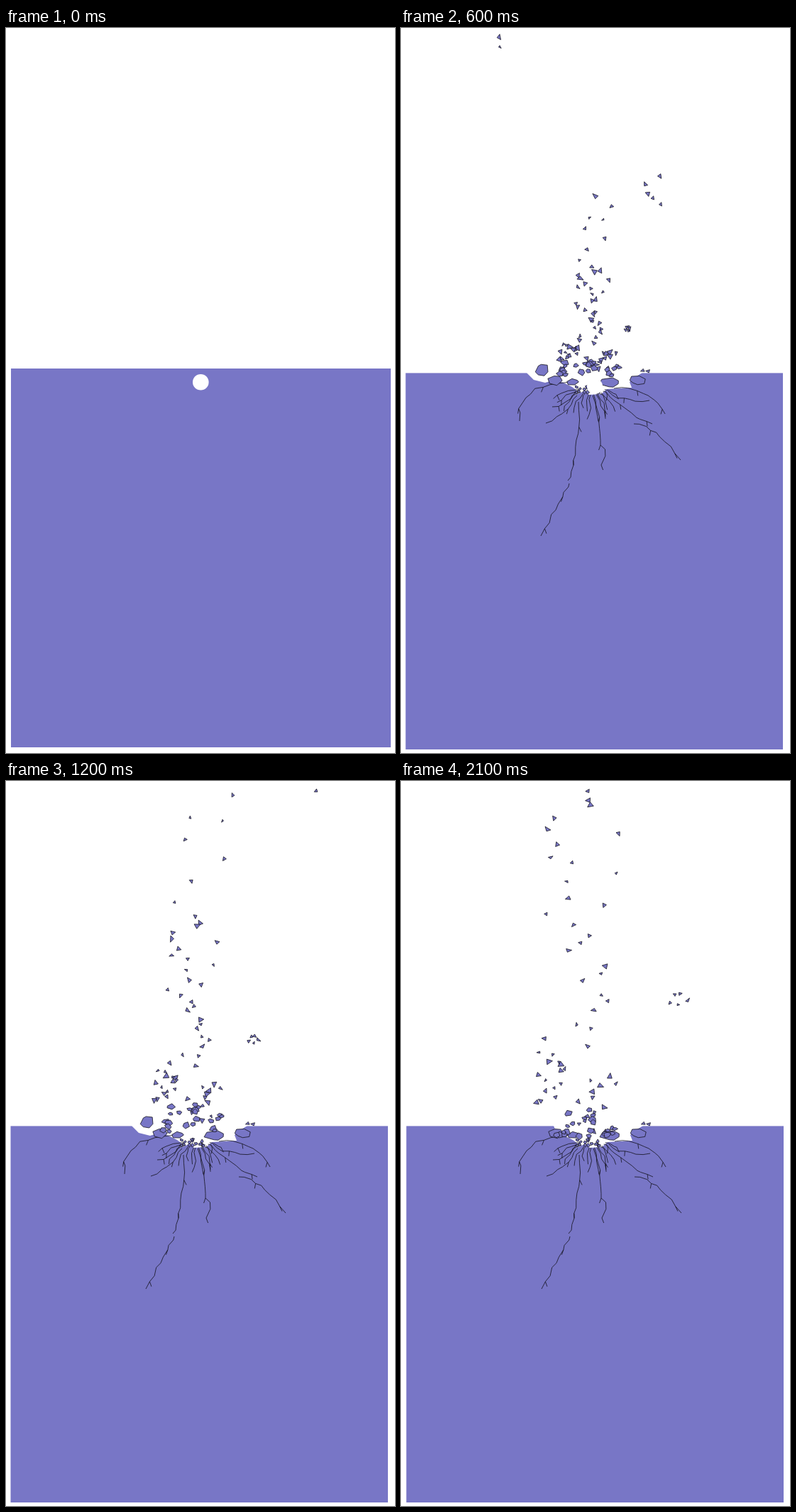
These frames come from a looping animation (548x1022 px, 2.2 s). An HTML page with a canvas:

```html
<!DOCTYPE html>
<html lang="en">
<head>
<meta charset="utf-8">
<title>Impact</title>
<style>
html, body { margin: 0; width: 100%; height: 100%; overflow: hidden; background: #fff; }
canvas { display: block; }
</style>
</head>
<body>
<canvas id="stage" width="548" height="1022"></canvas>
<script>
const ctx = document.getElementById('stage').getContext('2d');
const FILL = '#7876c6', INK = '#15131f', GRAVITY = 0.45, GROUND = 486.4;

// Launch ranges; speeds are pixels per step of 100 ms.
const bursts = [
  { name: 'sparks left', n: 3, x: [268, 274], vx: [-27, -17], vy: [-86, -80], r: 3 },
  { name: 'sparks right', n: 3, x: [270, 276], vx: [25, 33], vy: [-90, -84], r: 3 },
  { name: 'right shot', n: 5, x: [274, 296], vx: [11.4, 12], vy: [-50.5, -42], r: 3 },
  { name: 'column', n: 8, x: [262, 274], vx: [-3, 4], vy: [-46, -30], r: 3.2 },
  { name: 'plume', n: 29, x: [250, 292], vx: [-3.6, 1.6], vy: [-29, -9.5], r: 3.4 },
  { name: 'right cluster', n: 5, x: [288, 292], vx: [4.2, 5.6], vy: [-14.6, -13.5], r: 2.8 },
  { name: 'left debris', n: 14, x: [234, 262], vx: [-2.6, -1], vy: [-10.5, -6.6], r: 3.5 },
  { name: 'low debris', n: 14, x: [264, 310], vx: [-1.8, 0.6], vy: [-9, -4.5], r: 3.5 },
  { name: 'chunks', n: 22, x: [222, 312], vx: [-0.5, 0.4], vy: [-6.4, -3], r: 4.6, sides: 5 }
];

// Start, bend and end of the long cracks
const cracks = [
  [250, 527, 253, 600, 235, 638], [237, 642, 224, 670, 197, 716],
  [270, 518, 284, 560, 281, 588], [281, 588, 293, 596, 282, 616],
  [288, 512, 318, 546, 354, 558], [292, 512, 315, 530, 350, 525],
  [300, 508, 352, 505, 372, 544], [328, 558, 364, 566, 394, 609],
  [240, 499, 160, 502, 167, 554], [246, 512, 232, 534, 213, 534],
  [248, 518, 236, 545, 204, 557]
];

const rnd = n => { const v = Math.sin(n * 127.1 + 3.7) * 43758.5453; return v - Math.floor(v); };
const mix = (a, b, k) => a + (b - a) * k;

function disc(x, y, r) {
  ctx.fillStyle = '#fff';
  ctx.beginPath();
  ctx.arc(x, y, r, 0, Math.PI * 2);
  ctx.fill();
}

function chip(x, y, r, sides, seed, turn, flat = 1) {
  ctx.beginPath();
  for (let i = 0; i < sides; i++) {
    const angle = turn + (i + 0.5 * rnd(seed + i * 9)) * Math.PI * 2 / sides;
    const d = r * (0.75 + 0.5 * rnd(seed + i * 5 + 2));
    ctx.lineTo(x + d * Math.cos(angle), y + d * Math.sin(angle) * flat);
  }
  ctx.closePath();
  ctx.fillStyle = FILL;
  ctx.fill();
  ctx.stroke();
}

function crack([x0, y0, xb, yb, x1, y1], seed) {
  const n = Math.max(3, Math.round(Math.hypot(x1 - x0, y1 - y0) / 9));
  ctx.beginPath();
  for (let i = 0; i <= n; i++) {
    const k = i / n, wobble = i % n ? 4 : 0;
    const x = mix(mix(x0, xb, k), mix(xb, x1, k), k) + wobble * (rnd(seed + i) - 0.5);
    const y = mix(mix(y0, yb, k), mix(yb, y1, k), k) + wobble * (rnd(seed + i + 50) - 0.5);
    ctx.lineTo(x, y);
    if (i % 5 === 3) { // a short twig
      ctx.lineTo(x + 7 * (rnd(seed + i + 9) - 0.5), y + 7);
      ctx.moveTo(x, y);
    }
  }
  ctx.stroke();
}

function drawCracks() {
  cracks.forEach((c, i) => crack(c, i * 31));
  // Short cracks fan out below the crater
  for (let i = 0; i < 14; i++) {
    const angle = Math.PI * (0.1 + 0.8 * (i + rnd(i)) / 14);
    const far = 22 + 26 * rnd(i + 7), c = Math.cos(angle), s = Math.sin(angle);
    crack([268 + 20 * c, 506 + 11 * s, 268 + far * c, 506 + 0.6 * far * s,
      268 + far * 1.2 * c, 506 + far * s], i * 17);
  }
}

function drawCrater(filled) {
  const lip = filled ? '214,486 217,493' : '177,486 187,496 203,500 216,496';
  const edge = lip + ' 229,500 241,506 248,511 245,517 258,512 265,517 282,516 290,509 325,507 322,499 330,492 340,486';
  ctx.beginPath();
  for (const p of edge.split(' ')) ctx.lineTo(...p.split(','));
  ctx.fillStyle = '#fff';
  ctx.fill();
}

function drawStones() {
  chip(296, 500, 14, 7, 3, 0, 0.5);
  chip(333, 497, 10, 7, 9, 0.3, 0.7);
  chip(217, 497, 11, 6, 5, 0, 0.5);
  chip(243, 499, 8, 6, 8, 0, 0.6);
  chip(341, 483, 3.2, 3, 4, 0);
  chip(348, 484, 3, 3, 6, 1);
  for (let i = 0; i < 16; i++)
    chip(247 + 35 * rnd(i + 40), 505 + 11 * rnd(i + 80), 2.4, 4, i * 7, i);
}

function fly({ n, x, vx, vy, r, sides = 3 }, base, s) {
  for (let i = 0; i < n; i++) {
    const seed = base + i * 13, pick = k => rnd(seed + k);
    const px = mix(...x, pick(3)) + mix(...vx, pick(4)) * s;
    const rise = mix(...vy, (i + pick(5)) / n) * s + GRAVITY / 2 * s * s;
    const floor = 489 + 12 * pick(6);
    chip(px, Math.min(floor, 500 + rise), r * (0.75 + 0.45 * pick(7)), sides, seed,
      pick(1) * 6 + s * (pick(2) - 0.5), sides > 3 ? 0.8 : 1);
  }
}

function draw(step) {
  ctx.setTransform(1, 0, 0, 1, 0, 0);
  ctx.fillStyle = '#fff';
  ctx.fillRect(0, 0, 548, 1022);
  ctx.fillStyle = FILL;
  if (step === 0) {
    ctx.fillRect(7, 480, 535, 534);
    disc(274.3, 499.3, 11.3);
    return;
  }
  const s = Math.min(step, 20.4), settled = s >= 18;
  ctx.translate(step > 16 ? 1 : 0, 0);
  ctx.fillRect(6.5, GROUND, 531.5, 1017 - GROUND);
  ctx.strokeStyle = INK;
  ctx.lineWidth = 0.8;
  drawCrater(settled);
  drawCracks();
  drawStones();
  if (!settled) chip(199, 480 + 0.11 * (s - 10) ** 2, 8.5, 7, 2, 0);
  bursts.forEach((b, i) => fly(b, i * 1000, s));
  if (s < 7) disc(273, 505, 11);
}

function tick(now) {
  draw(Math.floor(now % 2200 / 100));
  requestAnimationFrame(tick);
}
draw(0);
requestAnimationFrame(tick);
</script>
</body>
</html>
```
